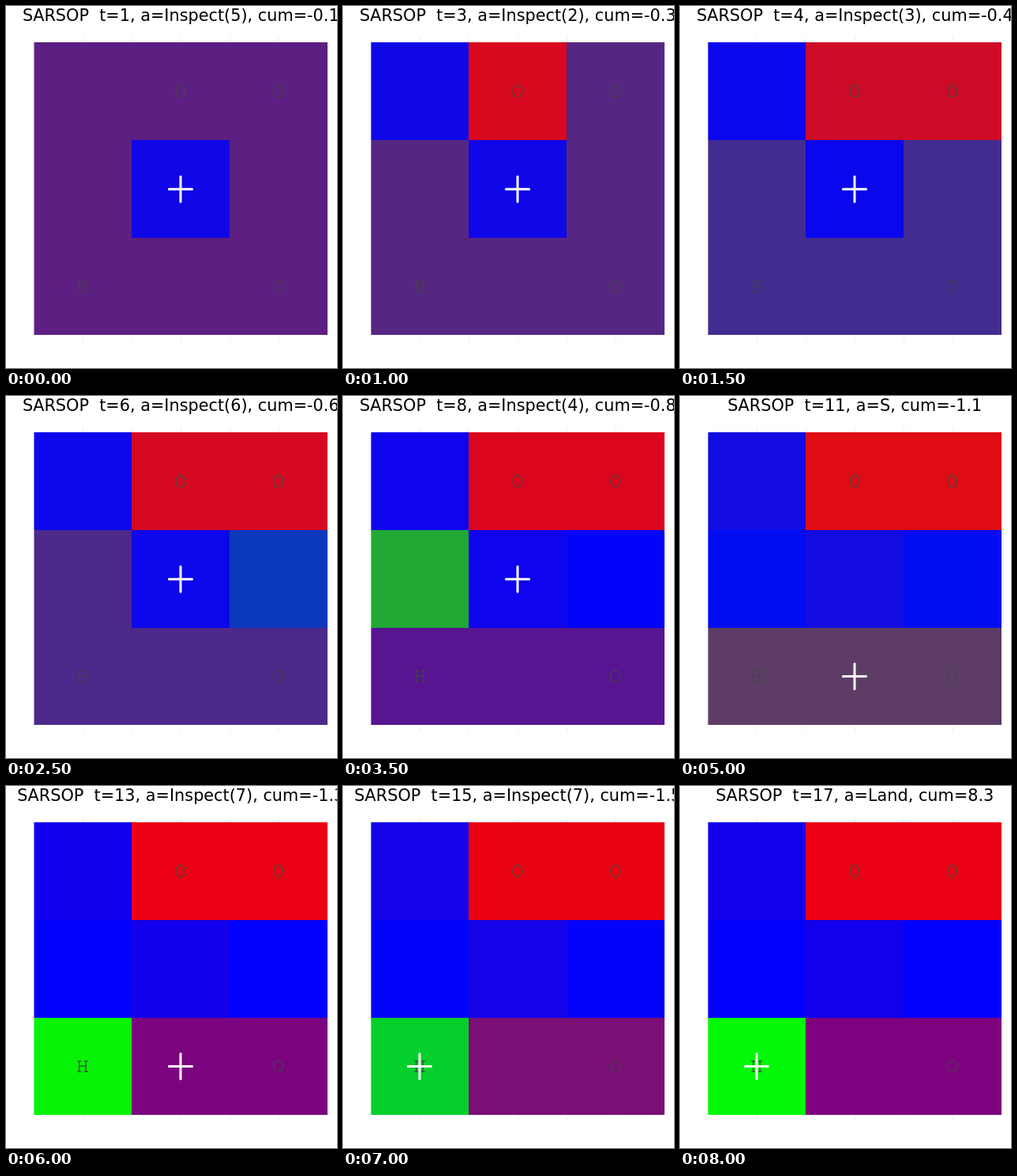
An HTML page with a canvas for the animation above (8500 ms loop, 419 by 459 pixels).

```html
<!DOCTYPE html>
<html lang="en">
<head>
<meta charset="utf-8">
<title>SARSOP belief</title>
<style>
  html, body { margin: 0; width: 100%; height: 100%; overflow: hidden; background: #fff; }
  canvas { display: block; }
</style>
</head>
<body>
<canvas id="stage" width="419" height="459"></canvas>
<script>
const ctx = document.getElementById('stage').getContext('2d');
const STEP_MS = 500;
const EDGES_X = [35.5, 159, 283, 407];
const EDGES_Y = [46, 170, 294, 417];
const CENTER_X = [97, 221, 344.7];
const CENTER_Y = [108, 232.3, 355.5];

// Each inspection is a cell number and the observed state; other entries are moves.
// States: O = obstacle (red), H = home (green), F = free (blue).
const PLAN = '5F 1F 2O 3O 6H 6F 6F 4H 4F 4F S 7H 7H W 7F 7H Land'.split(' ');
const MOVES = { S: 3, W: -1 };
const STATES = 'OHF';
const HIT = 0.8, MISS = 0.1;

// All maps with three obstacles and one home on nine cells.
const worlds = [];
for (let home = 0; home < 9; home++)
  for (let a = 0; a < 9; a++)
    for (let b = a + 1; b < 9; b++)
      for (let c = b + 1; c < 9; c++) {
        if ([a, b, c].includes(home)) continue;
        const cells = Array(9).fill('F');
        cells[home] = 'H';
        cells[a] = cells[b] = cells[c] = 'O';
        worlds.push({ cells, weight: 1 });
      }

function beliefColors() {
  const total = worlds.reduce((sum, w) => sum + w.weight, 0);
  return Array.from({ length: 9 }, (_, i) => {
    const rgb = [0, 0, 0];
    for (const w of worlds) rgb[STATES.indexOf(w.cells[i])] += w.weight / total;
    return `rgb(${rgb.map(p => Math.round(p * 255))})`;
  });
}

function simulate() {
  let agent = 4, cum = 0;
  return PLAN.map((entry, i) => {
    let action = entry;
    cum -= 0.1;
    if (/^\d/.test(entry)) {
      const [cell, seen] = entry;
      action = `Inspect(${cell})`;
      for (const w of worlds) w.weight *= w.cells[cell - 1] === seen ? HIT : MISS;
    } else if (entry === 'Land') cum += 10;
    else agent += MOVES[entry];
    const title = `SARSOP  t=${i + 1}, a=${action}, cum=${cum.toFixed(1)}`;
    return { title, agent, colors: beliefColors() };
  });
}

const steps = simulate();

function line(x1, y1, x2, y2) {
  ctx.moveTo(x1, y1);
  ctx.lineTo(x2, y2);
}

function stroke(color, width, cap, build) {
  ctx.strokeStyle = color;
  ctx.lineWidth = width;
  ctx.lineCap = cap;
  ctx.beginPath();
  build();
  ctx.stroke();
}

const at = cell => [CENTER_X[cell % 3], CENTER_Y[Math.floor(cell / 3)]];

function drawO(cell) {
  const [x, y] = at(cell);
  stroke('#444', 1.2, 'butt', () => ctx.ellipse(x, y, 6, 7.3, 0, 0, Math.PI * 2));
}

function drawH(cell) {
  const [x, y] = at(cell);
  stroke('#444', 1.2, 'butt', () => {
    for (const side of [-4.2, 4.2]) {
      line(x + side, y - 7, x + side, y + 7);
      for (const end of [-6.7, 6.7]) line(x + side - 2.6, y + end, x + side + 2.6, y + end);
    }
    line(x - 4.2, y - 0.3, x + 4.2, y - 0.3);
  });
}

function drawAgent(cell) {
  const [x, y] = at(cell);
  stroke('#fff', 3, 'round', () => {
    line(x - 14.6, y, x + 14.6, y);
    line(x, y - 16, x, y + 16);
  });
}

function draw({ title, agent, colors }) {
  ctx.fillStyle = '#fff';
  ctx.fillRect(0, 0, 419, 459);

  stroke('rgba(0,0,0,0.05)', 1, 'butt', () => {
    for (let i = 1; i < 6; i++) {
      const x = Math.floor(35.5 + i * 61.9) + 0.5;
      line(x, 38, x, 426);
    }
  });

  colors.forEach((color, i) => {
    const col = i % 3, row = Math.floor(i / 3);
    const x = EDGES_X[col], y = EDGES_Y[row];
    ctx.fillStyle = color;
    ctx.fillRect(x, y, EDGES_X[col + 1] - x, EDGES_Y[row + 1] - y);
  });

  [1, 2, 8].forEach(drawO);
  drawH(6);
  drawAgent(agent);

  ctx.fillStyle = '#000';
  ctx.font = '20.8px "DejaVu Sans", sans-serif';
  ctx.fontKerning = 'none';
  ctx.textAlign = 'center';
  ctx.fillText(title, 221.3, 18.5);
}

let shown = -1;
function tick() {
  const index = Math.floor(performance.now() / STEP_MS) % steps.length;
  if (index !== shown) draw(steps[shown = index]);
  requestAnimationFrame(tick);
}
tick();
</script>
</body>
</html>
```
